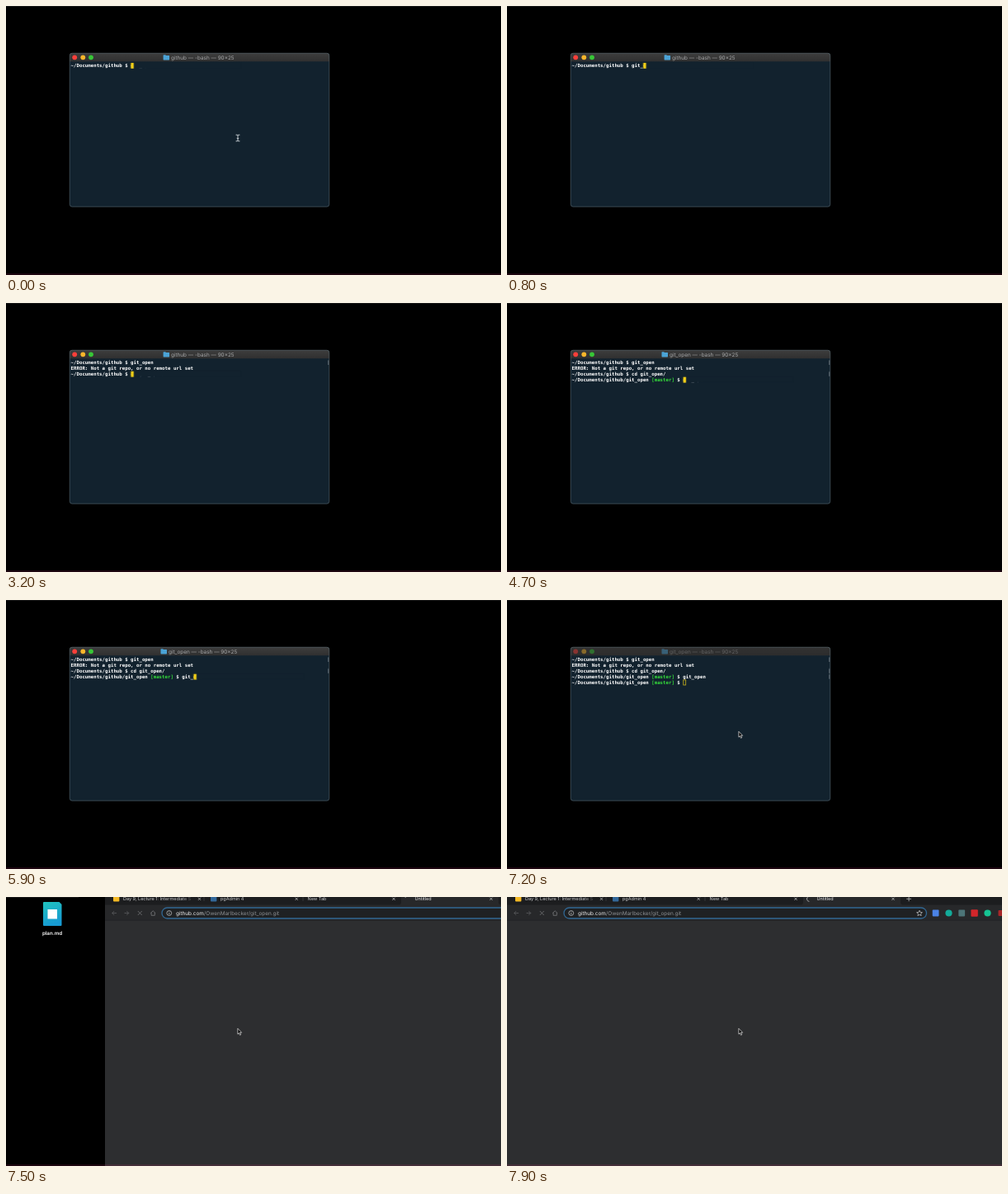
Animation of 600 by 326 pixels, one loop 8000 ms. Source, as an HTML page:

```html
<!DOCTYPE html>
<html lang="en">
<head>
<meta charset="utf-8">
<title>Terminal to browser</title>
<style>
html, body { margin: 0; width: 100%; height: 100%; overflow: hidden; background: #000; }
svg { display: block; width: 600px; height: 326px; text-rendering: geometricPrecision; }
text { white-space: pre; }
.term { font: bold 5.742px "DejaVu Sans Mono", monospace; fill: #fff; }
.title { font: 6.4px Inter, sans-serif; fill: #a8a9aa; }
.tabs { font: 5.5px Inter, sans-serif; fill: #c9cacc; }
.url { font: 6.4px Inter, sans-serif; fill: #8d9094; }
.file { font: 600 6.2px Inter, sans-serif; fill: #fff; }
.branch { fill: #35dc3b; }
.line { fill: none; stroke: #b9babc; stroke-width: .8; }
.dim { stroke: #5b5c5f; }
.mark { fill: #78838a; opacity: .75; }

/* every change is hard: 1.25% is one tenth of a second */
.scene, .caret, .ibeam, .arrow, .old, .on { animation: 8s step-end infinite; }
.scene { animation-name: slide; }
.caret { animation-name: type; }
.ibeam { animation-name: ibeam; }
.arrow { animation-name: blur; }
.old { animation-name: old; }
.enter1 { animation-name: enter1; }
.reply { animation-name: reply; }
.enter2 { animation-name: enter2; }
.repo { animation-name: repo; }
.enter3 { animation-name: enter3; }
.last { animation-name: last; }
.blur { animation-name: blur; }

@keyframes ibeam { 0% { opacity: 1 } 1.25%, to { opacity: 0 } }
@keyframes old { 0% { opacity: 1 } 58.75%, to { opacity: 0 } }
@keyframes enter1 { 0% { opacity: 0 } 25%, to { opacity: 1 } }
@keyframes reply { 0% { opacity: 0 } 26.25%, to { opacity: 1 } }
@keyframes enter2 { 0% { opacity: 0 } 53.75%, to { opacity: 1 } }
@keyframes repo { 0% { opacity: 0 } 58.75%, to { opacity: 1 } }
@keyframes enter3 { 0% { opacity: 0 } 81.25%, to { opacity: 1 } }
@keyframes last { 0% { opacity: 0 } 88.75%, to { opacity: 1 } }
@keyframes blur { 0% { opacity: 0 } 90%, to { opacity: 1 } }

/* columns are 3.457px wide, rows 6.9px high */
@keyframes type {
  0% { transform: translate(calc(3.457px * 21), 0) }
  1.25% { transform: translate(calc(3.457px * 22), 0) }
  2.5% { transform: translate(calc(3.457px * 23), 0) }
  5% { transform: translate(calc(3.457px * 24), 0) }
  8.75% { transform: translate(calc(3.457px * 25), 0) }
  12.5% { transform: translate(calc(3.457px * 26), 0) }
  17.5% { transform: translate(calc(3.457px * 27), 0) }
  18.75% { transform: translate(calc(3.457px * 28), 0) }
  20% { transform: translate(calc(3.457px * 29), 0) }
  25% { transform: translate(0, 6.9px) }
  26.25% { transform: translate(calc(3.457px * 21), 13.8px) }
  41.25% { transform: translate(calc(3.457px * 23), 13.8px) }
  43.75% { transform: translate(calc(3.457px * 24), 13.8px) }
  45% { transform: translate(calc(3.457px * 25), 13.8px) }
  48.75% { transform: translate(calc(3.457px * 26), 13.8px) }
  51.25% { transform: translate(calc(3.457px * 33), 13.8px); opacity: 1 }
  53.75% { transform: translate(0, 20.7px); opacity: 0 }
  58.75% { transform: translate(calc(3.457px * 39), 20.7px); opacity: 1 }
  67.5% { transform: translate(calc(3.457px * 41), 20.7px) }
  68.75% { transform: translate(calc(3.457px * 42), 20.7px) }
  73.75% { transform: translate(calc(3.457px * 43), 20.7px) }
  75% { transform: translate(calc(3.457px * 44), 20.7px) }
  76.25% { transform: translate(calc(3.457px * 45), 20.7px) }
  77.5% { transform: translate(calc(3.457px * 46), 20.7px) }
  78.75% { transform: translate(calc(3.457px * 47), 20.7px); opacity: 1 }
  81.25% { transform: translate(0, 27.6px); opacity: 0 }
  88.75% { transform: translate(calc(3.457px * 39), 27.6px); opacity: 1 }
  90%, to { transform: translate(calc(3.457px * 39), 27.6px); opacity: 0 }
}

@keyframes slide {
  0% { transform: none }
  91.25% { transform: translateX(-25px) }
  92.5% { transform: translateX(-189px) }
  93.75% { transform: translateX(-622px) }
  95% { transform: translateX(-712px) }
  96.25% { transform: translateX(-736px) }
  97.5%, to { transform: translateX(-742px) }
}

.spin { stroke-dasharray: 2 20; animation: spin 8s step-end infinite; }
@keyframes spin {
  95% { stroke-dasharray: 3.5 20 }
  96.25% { stroke-dasharray: 5 20 }
  97.5% { stroke-dasharray: 6.5 20 }
  98.75%, to { stroke-dasharray: 8 20 }
}
</style>
</head>
<body>
<svg viewBox="0 0 600 326">
  <defs>
    <linearGradient id="bar" x2="0" y2="1">
      <stop stop-color="#3d3d3d"/><stop offset="1" stop-color="#303030"/>
    </linearGradient>
    <linearGradient id="doc" x2=".3" y2="1">
      <stop stop-color="#20c3bd"/><stop offset="1" stop-color="#179bd3"/>
    </linearGradient>
    <linearGradient id="fade">
      <stop stop-color="#1c1d1f" stop-opacity="0"/><stop offset="1" stop-color="#1c1d1f"/>
    </linearGradient>
    <path id="folder" d="M0 .6Q0 0 .6 0H2.7L3.4 .8H7Q7.5 .8 7.5 1.4V5.6Q7.5 6.2 6.9 6.2H.6Q0 6.2 0 5.6Z" fill="#4ba3d6"/>
    <path id="x" d="M-1.6-1.6L1.6 1.6M1.6-1.6L-1.6 1.6"/>
    <rect id="mark" class="mark" x="390.2" y="69.4" width="1.1" height="5.6"/>
  </defs>

  <g class="scene">
    <!-- desktop -->
    <rect width="710" height="1" fill="#171717"/>
    <path d="M668 6H686.5L689.5 9V34Q689.5 35 688.5 35H668Q667 35 667 34V7Q667 6 668 6Z" fill="url(#doc)"/>
    <rect x="672.5" y="15" width="11.5" height="11.5" fill="#fff"/>
    <text class="file" x="678" y="46" text-anchor="middle">plan.md</text>

    <!-- terminal window -->
    <rect x="77" y="57" width="315" height="186.5" rx="3" fill="#12222e"/>
    <path d="M77 67.3V60Q77 57 80 57H389Q392 57 392 60V67.3Z" fill="url(#bar)"/>
    <circle cx="83.2" cy="62.3" r="2.9" fill="#fb3f3a"/>
    <circle cx="93.3" cy="62.3" r="2.9" fill="#f8b62b"/>
    <circle cx="103" cy="62.3" r="2.9" fill="#38c637"/>
    <g class="title">
      <g class="old">
        <use href="#folder" x="190.6" y="59.2"/>
        <text x="200" y="64.7">github — -bash — 90×25</text>
      </g>
      <g class="on repo">
        <use href="#folder" x="187.5" y="59.2"/>
        <text x="197" y="64.7">git_open — -bash — 90×25</text>
      </g>
    </g>
    <rect class="on blur" x="77.5" y="57.5" width="314" height="9.6" rx="2.5" fill="#2b2b2b" fill-opacity=".55"/>
    <rect x="77.2" y="57.2" width="314.6" height="186" rx="3" fill="none" stroke="#55636b" stroke-width=".6"/>

    <g class="term">
      <text x="78.6" y="74.2">~/Documents/github $ git_open</text>
      <g class="on reply">
        <text x="78.6" y="81.1">ERROR: Not a git repo, or no remote url set</text>
        <text x="78.6" y="88">~/Documents/github $ cd git_open/</text>
      </g>
      <text class="on repo" x="78.6" y="94.9">~/Documents/github/git_open <tspan class="branch">[master]</tspan> $ git_open</text>
      <text class="on last" x="78.6" y="101.8">~/Documents/github/git_open <tspan class="branch">[master]</tspan> $</text>
    </g>
    <use class="on enter1" href="#mark"/>
    <use class="on enter2" href="#mark" y="13.8"/>
    <use class="on enter3" href="#mark" y="20.7"/>

    <!-- the caret hides the text that is not typed yet -->
    <g class="caret">
      <rect x="78.6" y="68.9" width="134" height="6.9" fill="#12222e"/>
      <rect x="78.7" y="68.9" width="3.5" height="6.9" fill="#f2cf16"/>
    </g>
    <rect class="on blur" x="213.8" y="96.9" width="2.9" height="6.1" fill="none" stroke="#c9b21c" stroke-width=".8"/>

    <!-- browser -->
    <g transform="translate(742)">
      <rect width="722" height="326" fill="#2d2e30"/>
      <rect width="722" height="10" fill="#1c1d1f"/>
      <rect y="9.5" width="722" height="18.8" fill="#27282a"/>
      <path d="M355 10Q359 10 359 6V0H477V6Q477 10 481 10Z" fill="#27282a"/>
      <path d="M0 28.3H722" stroke="#1f2022" stroke-width=".6"/>
      <path d="M120 0V5M240 0V5" stroke="#48494c" stroke-width=".6"/>
      <rect x="10" y="-2" width="7.4" height="7.4" rx="1" fill="#f4b925"/>
      <rect x="128" y="-2" width="7.4" height="7.4" rx="1" fill="#33689a"/>
      <g class="tabs">
        <text x="22" y="4.2">Day 9, Lecture 1: Intermediate S</text>
        <rect x="92" y="-2" width="17" height="9" fill="url(#fade)"/>
        <text x="140" y="4.2">pgAdmin 4</text>
        <text x="245.5" y="4.2">New Tab</text>
        <text x="375.5" y="4.2" fill="#e6e7e8">Untitled</text>
      </g>
      <g class="line">
        <use href="#x" x="114.5" y="2.3"/>
        <use href="#x" x="232.2" y="2.3"/>
        <use href="#x" x="350" y="2.3"/>
        <use href="#x" x="468" y="2.3"/>
        <path d="M484.2 2.3H490M487.1 -.6V5.2"/>
        <path class="spin" d="M365.3 -.5A3.1 3.1 0 0 0 367 5.4"/>
        <path class="dim" d="M14 19.5H8.7M11.2 17L8.7 19.5L11.2 22M23.5 19.5H28.8M26.3 17L28.8 19.5L26.3 22"/>
        <path d="M39.8 17L44.8 22M44.8 17L39.8 22" stroke="#737477"/>
        <path d="M55.2 19.6L58.2 16.8L61.2 19.6M56.1 19V22.3H60.3V19" stroke="#77787b"/>
      </g>
      <rect x="69" y="13" width="439.5" height="13" rx="6.5" fill="#1f2123" stroke="#316793" stroke-width="1.3"/>
      <g class="line">
        <circle cx="77.8" cy="19.5" r="2.9"/>
        <path d="M77.8 19V21.2M77.8 17.5V18.2"/>
        <path d="M500 16.2L501 18.5L503.4 18.7L501.6 20.3L502.1 22.7L500 21.4L497.9 22.7L498.4 20.3L496.6 18.7L499 18.5Z"/>
      </g>
      <text class="url" x="86" y="21.8"><tspan fill="#f0f1f2">github.com</tspan>/OwenMarlbecker/git_open.git</text>
      <rect x="515.7" y="15.6" width="7.8" height="7.8" rx=".8" fill="#4b83e6"/>
      <circle cx="535.5" cy="19.5" r="4.1" fill="#13ab9a"/>
      <rect x="547.3" y="15.6" width="7.8" height="7.8" rx=".8" fill="#4c7477"/>
      <rect x="562.4" y="15.3" width="8.4" height="8.4" rx="1" fill="#d2262b"/>
      <circle cx="582.5" cy="19.5" r="4.1" fill="#16c493"/>
      <rect x="595.5" y="16" width="7" height="7" rx="1" fill="#a82729"/>
    </g>
  </g>

  <rect y="324" width="600" height="2" fill="#e0307a" opacity=".13"/>

  <!-- pointers -->
  <g class="ibeam" fill="none" stroke="#c4cbd0" stroke-width="1">
    <path d="M278.6 156.2H280Q281 156.2 281 157V163Q281 163.8 280 163.8H278.6M283.4 156.2H282Q281 156.2 281 157M283.4 163.8H282Q281 163.8 281 163M279.8 160.6H282.2"/>
  </g>
  <path class="arrow" d="M280.9 159.3V166.2L282.4 164.8L283.5 167.3L284.7 166.8L283.6 164.3H285.6Z" fill="#000" stroke="#eee" stroke-width=".7"/>
</svg>
</body>
</html>
```
